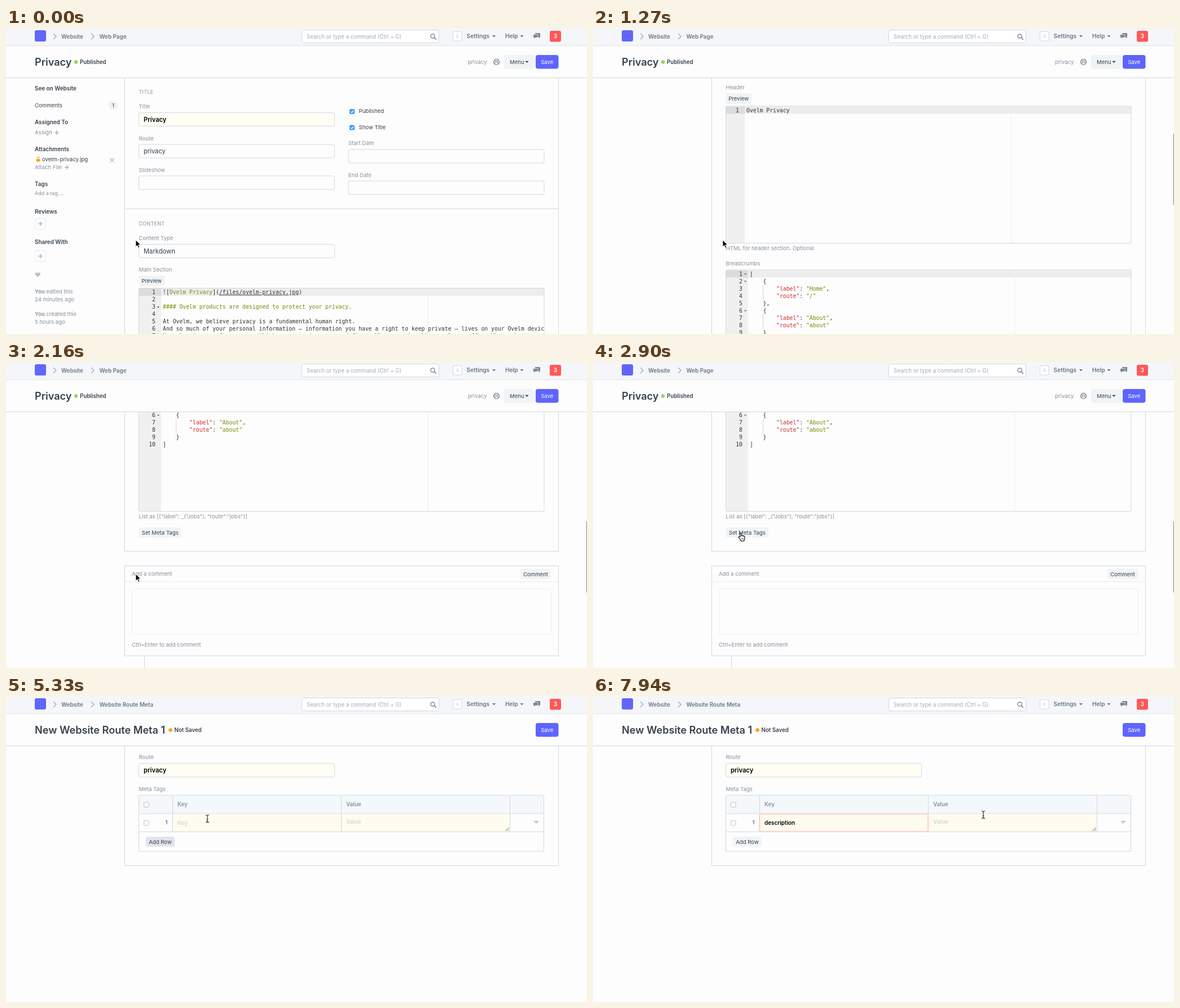
Animation of 1030x544 px, one loop 8 s. Source, as an HTML page:

```html
<!DOCTYPE html>
<html lang="en">
<head>
<meta charset="utf-8">
<title>Web page meta tags</title>
<style>
  html, body { margin: 0; width: 100%; height: 100%; overflow: hidden; background: #fdfdfd; }
  #stage { display: block; width: 100vw; height: 100vh; }
  text { font-family: Inter, sans-serif; font-optical-sizing: none; fill: #36414c; white-space: pre; }
  .gray { fill: #84909d; }
  .hint { fill: #a3acb6; }
  .pale { fill: #d1d8dd; }
  .white { fill: #fff; }
  .black { fill: #000; }
  .nav { fill: #6c7680; }
  .bold { font-weight: 600; }
  .caps { letter-spacing: .37px; }
  .mid { text-anchor: middle; }
  .code { font-family: "DejaVu Sans Mono", monospace; fill: #333; }
  .num { text-anchor: end; }
  .olive { fill: #718c00; }
  .red { fill: #c82829; }
  .link { text-decoration: underline; }
</style>
</head>
<body>
<svg id="stage" viewBox="0 0 1030 544" preserveAspectRatio="none"></svg>
<script>
const LINE = '#d1d8dd', BUTTON = '#f0f4f7', HOVER = '#dfe5ea', PAGE = '#fdfdfd', YELLOW = '#fffdf4', BLUE = '#5e64ff';
const BASE = 9.6, BOLD = 9.88, INPUT = 11.2;

// y is the vertical centre of the capitals
const text = (x, y, s, cls = '', size = /bold/.test(cls) ? BOLD : BASE) =>
  `<text x="${x}" y="${y + size * .36}" class="${cls}" font-size="${size}">${s}</text>`;
const box = (x, y, w, h, fill = 'none', stroke = 'none', r = 0, more = '') =>
  `<rect x="${x}" y="${y}" width="${w}" height="${h}" rx="${r}" fill="${fill}" stroke="${stroke}" ${more}/>`;
const path = (d, stroke = LINE, fill = 'none', width = 1) =>
  `<path d="${d}" stroke="${stroke}" fill="${fill}" stroke-width="${width}"/>`;
const group = (id, body) => `<g id="${id}">${body}</g>`;
const label = (x, y, s) => text(x, y, s, 'gray');
const heading = (y, s) => text(235.5, y, s, 'gray caps', 8.87);
const plus = (x, y, r = 4) => path(`M${x - r} ${y}h${2 * r}M${x} ${y - r}v${2 * r}`, '#8d99a6', 'none', 1.1);
const caret = (x, y, w = 3.2, color = '#6c7680') => path(`M${x - w} ${y - w / 2}h${2 * w}l${-w} ${w}z`, 'none', color);
const chevron = (x, y, up) => path(`M${x - 4} ${y + 2 * up}l4 ${-4 * up} 4 ${4 * up}`, '#a4adb7');
const input = (x, y, value = '', cls = '', fill = PAGE) =>
  box(x + .5, y + .5, 347, 24, fill, LINE, 3) + text(x + 9, y + 12.7, value, cls, INPUT);
const button = (x, y, w, h, s, id = '') =>
  box(x, y, w, h, BUTTON, 'none', 3, id && `id="${id}"`) + text(x + w / 2, y + h / 2 + .2, s, 'mid');

function highlight(line) {
  if (line.startsWith('####')) return `<tspan class="olive">${line}</tspan>`;
  return line
    .replace(/("[^"]*")(:?)/g, (_, s, colon) => `<tspan class="${colon ? 'red' : 'olive'}">${s}</tspan>${colon}`)
    .replace(/!\[(.*?)\]\((.*?)\)/, '![<tspan class="olive">$1</tspan>](<tspan class="link">$2</tspan>)');
}

function editor(top, gutter, lines) {
  const step = 13.03, size = 9.77;
  const rows = lines.map((line, i) => {
    const y = 6.7 + i * step;
    const fold = /^####|[{[]$/.test(line) ? caret(gutter - 5, y + .5, 2.3, '#666') : '';
    const guide = /^ {8}/.test(line) ? path(`M${gutter + 26.5} ${y - 6.5}v13`, '#d4d4d4') : '';
    return text(gutter - 10, y, i + 1, 'code num', size) + fold + guide +
      text(gutter + 3, y, highlight(line), 'code', size);
  });
  return `<svg x="236" y="${top}" width="718" height="243">` +
    box(0, 0, gutter, 243, '#f0f0f0') + path(`M${gutter + 472.5} 0v243`, '#ececec') +
    box(0, 0, gutter, 13, '#dcdcdc') + box(gutter, 0, 718, 13, '#ededed') +
    rows.join('') + '</svg>' + box(235.5, top - .5, 718.5, 243.5, 'none', LINE, 2);
}

const article = [
  '![Ovelm Privacy](/files/ovelm-privacy.jpg)', '',
  '#### Ovelm products are designed to protect your privacy.', '',
  'At Ovelm, we believe privacy is a fundamental human right.',
  'And so much of your personal information – information you have a right to keep private – lives on your Ovelm devices.',
  'Your heart rate after a run. Which news stories you read first. Where you bought your last coffee. What websites you visit.',
  'Every Ovelm product is designed from the ground up to protect that information. And to empower you to choose what you share.',
  'We’ve proved time and again that great experiences don’t have to come at the expense of your privacy and security.', '',
  '#### Only you can access your device.', '',
  'You can easily secure your devices with a six-digit passcode, which is very tough to crack since there are a million',
  '', '#### Your personal data belongs to you, not others.', '',
  'Whether you’re taking a photo, asking Jelu a question, or getting directions, you can do it knowing that Ovelm doesn’t',
  '', ''];
const crumbs = JSON.stringify(
  [{ label: 'Home', route: '/' }, { label: 'About', route: 'about' }], null, 4).split('\n');

const addBox = y => box(51.5, y, 19, 19, 'none', LINE, 3, 'stroke-dasharray="2 2"') + plus(61, y + 9.5);
const tick = y => box(609, y - 4.5, 9, 9, '#3b99fc', 'none', 2) + path(`M611.3 ${y}l1.8 2 3-4`, '#fff', 'none', 1.3);

const sidebar =
  text(51, 107.3, 'See on Website', 'bold') +
  text(51, 137.7, 'Comments') + box(182, 129.5, 16, 16, '#edf0f4', 'none', 8) + text(190, 137.7, 1, 'mid', 9) +
  text(51, 167, 'Assigned To', 'bold') + label(51, 186, 'Assign') + plus(90, 186) +
  text(51, 215, 'Attachments', 'bold') +
  box(54, 233, 6.5, 4.5, '#ffa00a', 'none', .8) + path('M55.3 233v-1.7a2 2 0 0 1 4 0', '#ffa00a', 'none', 1.2) +
  text(64, 234, 'ovelm-privacy.jpg') + path('M184.5 231.5l7 7m0-7l-7 7', '#b8c2cc', 'none', 1.7) +
  label(51, 247.8, 'Attach File') + plus(108, 247.8) +
  text(51, 277, 'Tags', 'bold') + text(51, 293.7, 'Add a tag ...', 'gray', 9) +
  text(51, 326.7, 'Reviews', 'bold') + addBox(338.5) +
  text(51, 380.5, 'Shared With', 'bold') + addBox(396) +
  path('M56.3 443l-4.3-4.3c-2-3 2-5.6 4.3-2.6 2.3-3 6.3-.4 4.3 2.6z', 'none', '#b8c2cc') +
  label(51, 469, '<tspan class="bold">You</tspan> edited this') + label(51, 483, '24 minutes ago') +
  label(51, 509, '<tspan class="bold">You</tspan> created this') + label(51, 523, '5 hours ago');

const sectionLines = [321.5, 731.5, 773, 814.5, 856].map(y => `M210.5 ${y}H979.5`).join('');
const form =
  path('M210.5 88V1544.5H979.5V88' + sectionLines) +
  heading(114, 'TITLE') + label(235.5, 140, 'Title') + input(235, 150, 'Privacy', 'bold black', YELLOW) +
  label(235.5, 196.5, 'Route') + input(235, 206.5, 'privacy') +
  label(235.5, 252.5, 'Slideshow') + input(235, 262.5) +
  tick(148.5) + text(625.5, 148, 'Published') + tick(177) + text(625.5, 176.7, 'Show Title') +
  label(607, 205, 'Start Date') + input(606.5, 215.5) +
  label(607, 261.3, 'End Date') + input(606.5, 271.5) +
  heading(348, 'CONTENT') + label(235.5, 374, 'Content Type') + input(235, 384, 'Markdown') +
  label(235.5, 430, 'Main Section') + button(235.5, 440, 45.5, 19, 'Preview') + editor(463, 39, article) +
  heading(753, 'SCRIPT') + chevron(281.5, 753, -1) +
  heading(794.5, 'STYLE') + chevron(277, 794.5, -1) +
  heading(836, 'SIDEBAR AND COMMENTS') + chevron(369, 836, -1) +
  heading(878, 'HEADER, BREADCRUMBS AND META TAGS') + chevron(443, 878, 1) +
  label(235.5, 906, 'Header') + button(235.5, 916, 45.5, 19, 'Preview') + editor(939.5, 33, ['Ovelm Privacy']) +
  label(235.5, 1191.5, 'HTML for header section. Optional') +
  label(235.5, 1219, 'Breadcrumbs') + editor(1230.5, 39, crumbs) +
  label(235.5, 1483, 'List as [{"label": _("Jobs"), "route":"jobs"}]') +
  button(235.5, 1502, 75.5, 18, 'Set Meta Tags', 'setTags') +
  box(210.5, 1570.5, 769, 160, 'none', LINE) + path('M210.5 1598.5H979.5', '#e4e9ed') +
  label(223, 1585, 'Add a comment') + button(912, 1576, 54, 18, 'Comment') +
  box(223.5, 1611.5, 743, 81, 'none', '#ebeff2', 2) +
  label(223, 1711, 'Ctrl+Enter to add comment') + path('M245.5 1731V1900');

const checkbox = y => box(244.5, y, 8.5, 8.5, '#fff', '#b9c0c7', 1.5);
const footer = y =>
  path(`M235.5 ${y}V${y + 35}H953.5V${y}M210.5 88V${y + 60.5}H979.5V88`) + button(248, y + 9, 51, 17.5, 'Add Row');
const meta =
  label(235.5, 109, 'Route') + input(235, 119.5, 'privacy', 'bold black', YELLOW) +
  label(235.5, 165.3, 'Meta Tags') +
  box(235.5, 176.5, 718, 32.5, '#f5f8fb', LINE, 2) + path('M295.5 176.5V209M594.5 176.5V209M893.5 176.5V209') +
  checkbox(189) + text(304, 192, 'Key', 'bold gray') + text(603, 192, 'Value', 'bold gray') +
  group('emptyGrid',
    footer(274.5) + path('M235.5 209V274.5H953.5V209') + text(594.5, 242, 'No Data', 'mid pale', 11.1) +
    box(235.5, 176.7, 718, 98, 'none', '#ff5858', 2, 'id="gridError"') + path('M236 209H953')) +
  group('rowGrid',
    footer(241.2) + path('M235.5 209V241.5H953.5V209') +
    group('rowInputs',
      box(295, 209.5, 598.5, 31.5, '#fffbef') +
      text(304, 225, '', 'bold pale').replace('<text', '<text id="key"') + text(603, 223, 'Value', 'bold pale') +
      path('M885.5 240l6-6M889 240l2.5-2.5', '#555', 'none', .9)) +
    path('M295.5 209V241M594.5 209V241M893.5 209V241') +
    checkbox(221.5) + text(284.5, 225, 1, 'mid') + caret(940, 224.5, 5, '#c0c8cf') +
    group('keyFocus', box(295.5, 209.5, 298.5, 31.5, 'none', '#fde3e0', 1, 'stroke-width="3"') +
      box(295.5, 209.5, 298.5, 31.5, 'none', '#fbc8c3', 1)));

const title = (s, crumb, status, x, color) =>
  text(51, 60.5, s, 'bold', 18.1) + `<circle cx="${x}" cy="60.5" r="3.3" fill="${color}"/>` +
  text(x + 7, 60.3, status, 'bold', 9.75) + text(165.5, 15.3, crumb, 'bold nav');
const chrome =
  box(0, 0, 1030, 88, PAGE) + box(0, 0, 1030, 32, '#f4f6fa') + path('M0 31.5H1030', '#dfe4e9') + path('M0 88.5H1030') +
  box(51, 4, 20, 20, '#6166fa', 'none', 3) +
  path('M84 10l5 5-5 5M151 10l5 5-5 5', '#9aa4ae', 'none', 1.2) + text(98, 15.3, 'Website', 'bold nav') +
  box(524.5, 3.5, 243, 23, '#fff', LINE, 3) + text(533, 15.3, 'Search or type a command (Ctrl + G)', 'hint', 9.65) +
  `<circle cx="756.5" cy="14.5" r="3.7" fill="none" stroke="#6c7680" stroke-width="1.3"/>` +
  path('M759.2 17.2l3.5 3.5', '#6c7680', 'none', 1.6) +
  box(792.5, 6.5, 15.5, 16.5, '#fff', LINE, 2) + text(800.3, 14.8, 'A', 'mid pale') +
  text(816.5, 14.7, 'Settings', 'bold nav', 10.2) + caret(865, 14.7) +
  text(885, 14.7, 'Help', 'bold nav', 10.2) + caret(914.5, 14.7) +
  path('M938 9h9v7h-1v2.5l-2.5-2.5h-5.5z', 'none', '#7a858f') +
  path('M934.5 11.5h8.5v5.5h-4.5l-2.5 2.5v-2.5h-1.5z', '#f4f6fa', '#7a858f', .8) +
  box(964, 5, 20, 19.5, '#ff5858', 'none', 3) + text(974, 14.8, 3, 'bold mid white') +
  box(939.5, 48.5, 39.5, 23.5, BLUE, BLUE, 3) + text(959.3, 60.3, 'Save', 'mid white') +
  group('formHead', title('Privacy', 'Web Page', 'Published', 124, '#98d85b') +
    label(819, 60.3, 'privacy') + box(883, 48, 53, 24.5, BUTTON, 'none', 3) +
    text(893, 60.3, 'Menu') + caret(923.5, 60.3, 3.2, '#36414c') +
    path('M866.5 59v-3.5h6v3.5M866.5 62.5h-2v-4h10v4h-2M866.5 61h6v4h-6z', '#6c7680')) +
  group('metaHead', title('New Website Route Meta 1', 'Website Route Meta', 'Not Saved', 291.5, '#ffa00a'));

const cursors =
  group('arrow', path('M0 0V12l2.8-2.6 1.9 4.3 2-.9-1.9-4.2h3.8z', '#fff', '#000', .8)) +
  group('hand', path('M-1.2 7V.8q1.2-1.6 2.4 0v4.2q1.2-1 2.2.2 1.2-.7 2 .4 1.4-.4 1.6 1v3.4l-1.2 2.5v1.7h-5.8v-1.5l-3.6-4.7q-.6-1.7 1-1.6z', '#000', '#fff', 1.1) +
    path('M1.8 8.5v3M3.8 8.5v3', '#000', 'none', .7)) +
  group('beam', path('M-3-6.5q3 0 3 2 0-2 3-2M-3 6.5q3 0 3-2 0 2 3 2M0-5V5M-1.5 2h3', '#222', 'none', 1.1));

document.getElementById('stage').innerHTML =
  group('formPage', sidebar + form) + group('metaPage', meta) + chrome +
  box(1029, 0, 2, 127, '#7f7f7f', 'none', 1, 'id="scrollbar"') + cursors;

const scrolls = [[0, 0], [500, 116], [770, 437], [1040, 640], [1270, 800], [1510, 935],
  [1750, 1058], [1990, 1190], [2160, 1208]];
const pointer = [[0, 'arrow', 230, 377], [2340, 'arrow', 238, 362], [2530, 'arrow', 252, 332], [2720, 'hand', 261, 310],
  [2900, 'hand', 262, 304], [3340, 'arrow', 262, 304], [3850, 'arrow', 272, 298], [3970, 'arrow', 290, 284],
  [4120, 'arrow', 313, 267], [4270, 'arrow', 322, 262], [4390, 'arrow', 314, 269], [4510, 'arrow', 295, 280],
  [4630, 'hand', 275, 285], [4740, 'hand', 271, 285], [4860, 'arrow', 271, 285], [4970, 'arrow', 285, 274],
  [5090, 'arrow', 315, 250], [5210, 'beam', 345, 226], [5330, 'beam', 357, 218], [5450, 'beam', 357, 224],
  [5810, ''], [7710, 'beam', 357, 224], [7820, 'beam', 600, 215], [7940, 'beam', 692, 211]];
const typing = [[0, 0], [5810, 1], [5920, 2], [6040, 3], [6230, 4], [6420, 5], [6610, 6],
  [6800, 7], [6990, 9], [7110, 10], [7350, 11]];

const el = id => document.getElementById(id);
const show = (id, on) => el(id).style.display = on ? '' : 'none';
const at = (keys, t) => keys.findLast(key => key[0] <= t);
const move = (id, x, y) => el(id).setAttribute('transform', `translate(${x} ${y})`);
const [emptyButton, rowButton] = ['emptyGrid', 'rowGrid'].map(id => el(id).querySelector('rect'));

function draw(t) {
  const scroll = at(scrolls, t)[1];
  const [, kind, x, y] = at(pointer, t);
  const typed = 'description'.slice(0, at(typing, t)[1]);
  const onMeta = t >= 3340, hasRow = t >= 4860;

  for (const id of ['formPage', 'formHead']) show(id, !onMeta);
  for (const id of ['metaPage', 'metaHead']) show(id, onMeta);
  move('formPage', 0, -scroll);
  show('scrollbar', t >= 500 && t < 3200);
  el('scrollbar').setAttribute('y', 1 + scroll * .2335);
  el('setTags').setAttribute('fill', t >= 3050 ? HOVER : BUTTON);

  show('emptyGrid', !hasRow);
  show('gridError', t >= 3490);
  show('rowGrid', hasRow);
  show('rowInputs', t >= 4970);
  show('keyFocus', t >= 5450);
  emptyButton.setAttribute('fill', t >= 4630 ? HOVER : BUTTON);
  rowButton.setAttribute('fill', t < 5450 ? HOVER : BUTTON);
  el('key').textContent = typed || 'Key';
  el('key').setAttribute('class', typed ? 'bold black' : 'bold pale');

  for (const id of ['arrow', 'hand', 'beam']) show(id, id === kind);
  if (kind) move(kind, x, y);
}

function frame() {
  draw(performance.now() % 8000);
  requestAnimationFrame(frame);
}
frame();
</script>
</body>
</html>
```
